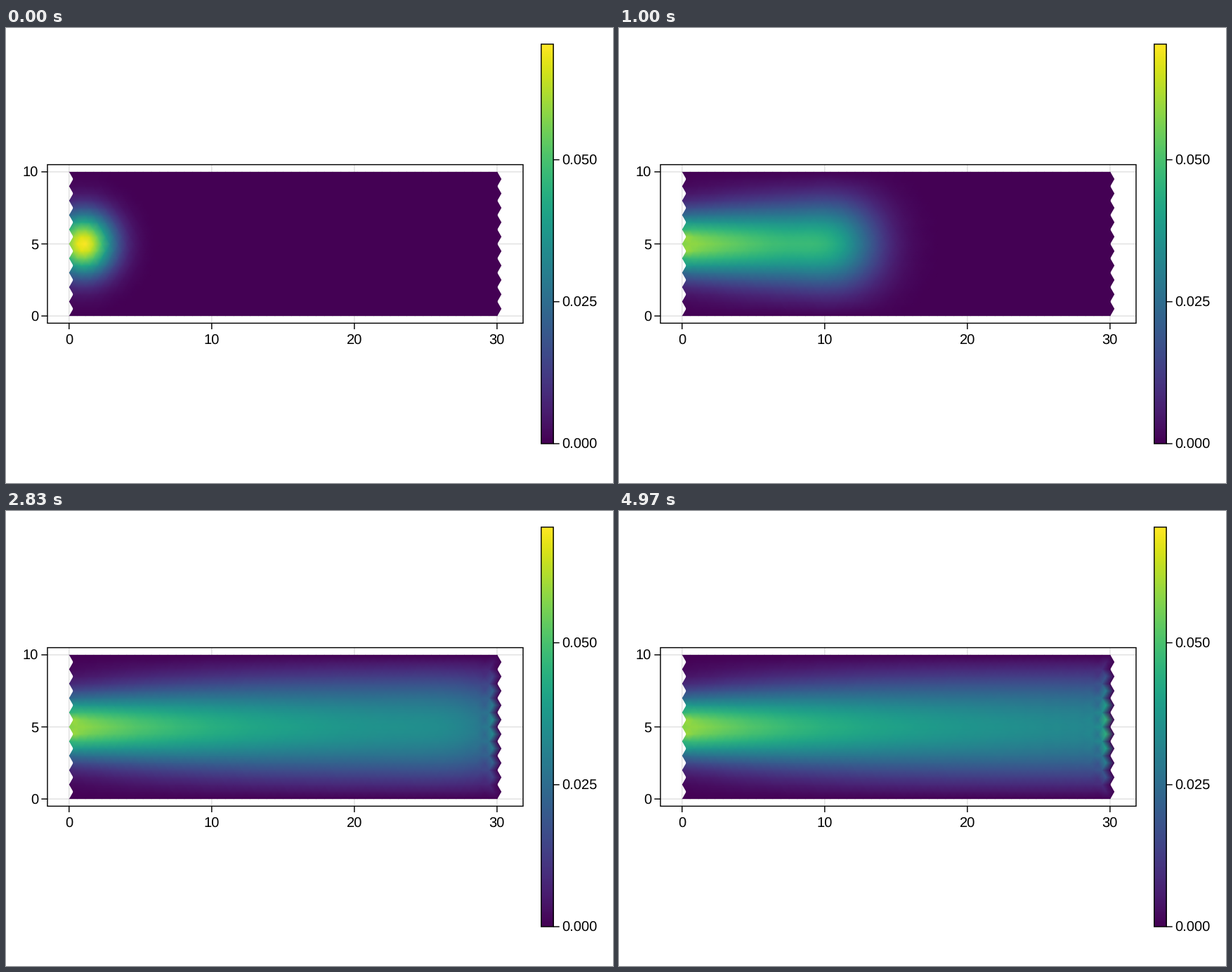
Animation, 864 px wide and 648 px high, one loop 5 s. Source, as a matplotlib script:

```python
import numpy as np
import matplotlib.pyplot as plt
from matplotlib.animation import FuncAnimation
from matplotlib.patches import Polygon, Rectangle

plt.rcParams.update({
    "font.family": "Liberation Sans",
    "font.size": 20.16,
    "text.hinting": "none",
    "path.snap": False,
})

W, H = 864, 648
LOOP, INTERVAL = 5000, 20
STATES, T_END = 150, 100.0
SPEED, DIFF = 0.5, 0.05
SIGMA = 1.5
LINE, TICK = 1.44, 8.64

# Equilateral triangle mesh, every other row shifted by half a cell
ROWS, COLS = 21, 53
STEP = 1 / np.sqrt(3)
row, col = np.divmod(np.arange(ROWS * COLS), COLS)
x = (col + 0.5 * (row % 2)) * STEP
y = row * 0.5


def mesh_triangles():
    tris = []
    for r in range(ROWS - 1):
        for c in range(COLS - 1):
            a = r * COLS + c
            b, d = a + 1, a + COLS
            e = d + 1
            tris += [(a, b, e), (a, e, d)] if r % 2 else [(a, b, d), (b, e, d)]
    return tris


def transport_matrix():
    """Finite volume advection and diffusion; values on the rim are held."""
    dx = x[None, :] - x[:, None]
    dy = y[None, :] - y[:, None]
    near = np.abs(np.hypot(dx, dy) - STEP) < 0.01
    scale = 1 / (3 * STEP**2)
    degree = near.sum(1)
    m = near * (2 * DIFF - SPEED * dx) * scale
    m -= np.diag(degree * 2 * DIFF * scale)
    m[degree < 6] = 0
    return m


def solve(u, times):
    """Adaptive third order Runge-Kutta, sampled with cubic interpolation."""
    m = transport_matrix()
    t, dt = 0.0, 0.1
    out = [u]
    while len(out) < len(times):
        k1 = m @ u
        k2 = m @ (u + dt / 2 * k1)
        k3 = m @ (u + dt * 3 / 4 * k2)
        new = u + dt * (2 * k1 + 3 * k2 + 4 * k3) / 9
        k4 = m @ new
        tol = 1e-6 + 1e-3 * np.maximum(np.abs(u), np.abs(new))
        gap = dt * (-5 * k1 + 6 * k2 + 8 * k3 - 9 * k4) / 72
        err = 0.5 * np.sqrt(np.mean((gap / tol) ** 2)) + 1e-9
        if err <= 1:
            while len(out) < len(times) and times[len(out)] <= t + dt:
                s = (times[len(out)] - t) / dt
                bend = dt * s * (1 - s) * ((1 - s) * k1 - s * k4)
                out.append(u + (new - u) * s * s * (3 - 2 * s) + bend)
            t, u = t + dt, new
        dt *= np.clip(0.9 * err ** (-1 / 3), 0.2, 5)
    return out


start = np.exp(-((x - 1) ** 2 + (y - 5) ** 2) / (2 * SIGMA**2))
start /= 2 * np.pi * SIGMA**2
TOP = start.max()
states = solve(start, np.linspace(0, T_END, STATES))

# Stage in pixel units, y downwards
fig = plt.figure(figsize=(W / 72, H / 72), dpi=72, facecolor="white")
ax = fig.add_axes([0, 0, 1, 1])
ax.axis("off")

LEFT, RIGHT, UPPER, LOWER = 59, 736, 194.6, 420.4
BAR_L, BAR_R, BAR_T, BAR_B = 761.8, 779.1, 23.0, 592.0


def px(v):
    span = x.max()
    return LEFT + (v + 0.05 * span) / (1.1 * span) * (RIGHT - LEFT)


def py(v):
    return LOWER - (v + 0.5) / 11 * (LOWER - UPPER)


def line(x0, y0, x1, y1, z=4, **kw):
    ax.plot([x0, x1], [y0, y1], lw=LINE, color="black",
            solid_capstyle="butt", zorder=z, **kw)


def label(tx, ty, text, ha):
    ax.text(tx, ty + 7.2, text, ha=ha, va="baseline", color="black")


def box(x0, y0, x1, y1):
    ax.add_patch(Rectangle((x0, y0), x1 - x0, y1 - y0, fill=False,
                           ec="black", lw=LINE, zorder=5))


for v in (0, 10, 20, 30):
    line(px(v), UPPER, px(v), LOWER, z=1, alpha=0.12)
    line(px(v), LOWER, px(v), LOWER + TICK)
    label(px(v), 444, str(v), "center")
for v in (0, 5, 10):
    line(LEFT, py(v), RIGHT, py(v), z=1, alpha=0.12)
    line(LEFT - TICK, py(v), LEFT, py(v))
    label(LEFT - 13, py(v), str(v), "right")
box(LEFT, UPPER, RIGHT, LOWER)

ax.imshow(np.linspace(0, 1, 256)[:, None], cmap="viridis", origin="lower",
          extent=(BAR_L, BAR_R, BAR_B, BAR_T), aspect="auto",
          interpolation="bilinear", zorder=2)
box(BAR_L, BAR_T, BAR_R, BAR_B)
for v in (0, 0.025, 0.05):
    ty = BAR_B - v / TOP * (BAR_B - BAR_T)
    line(BAR_R, ty, BAR_R + TICK, ty)
    label(BAR_R + 12.6, ty, f"{v:.3f}", "left")

field = ax.tripcolor(px(x), py(y), mesh_triangles(), start, shading="gouraud",
                     cmap="viridis", vmin=0, vmax=TOP, zorder=3)
ax.set_xlim(0, W)
ax.set_ylim(H, 0)

# Clip the shading to the zigzag outline so that its edges stay clean
grid = np.column_stack([px(x), py(y)]).reshape(ROWS, COLS, 2)
rim = np.concatenate([grid[0], grid[:, -1], grid[-1, ::-1], grid[::-1, 0]])
field.set_clip_path(Polygon(rim, transform=ax.transData))


def update(i):
    # state due at the middle of this frame, on a clock rounded to 10 ms
    now = (i + 0.5) * INTERVAL
    field.set_array(states[int((now + 5) * STATES / LOOP)])
    return [field]


anim = FuncAnimation(fig, update, frames=LOOP // INTERVAL, interval=INTERVAL,
                     repeat=True, repeat_delay=0)
plt.show()
```
